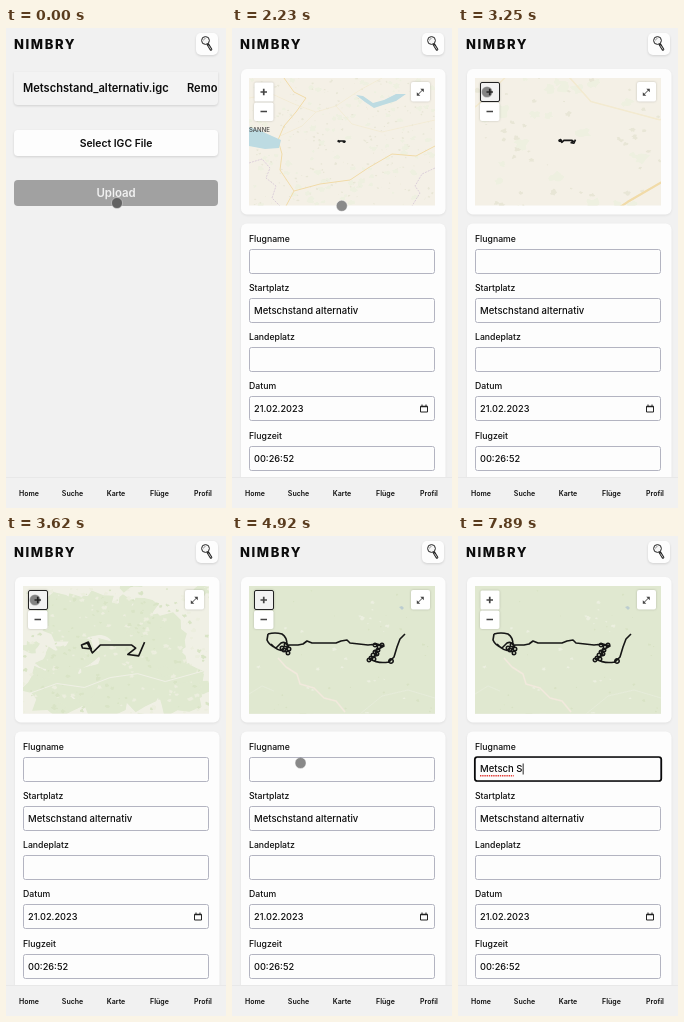
Write an HTML page that moves like this. It is 220 by 480 pixels and loops after 7990 ms.

```html
<!DOCTYPE html>
<html lang="de">
<head>
<meta charset="utf-8">
<title>Flug hochladen</title>
<style>
  html, body { margin: 0; width: 100%; height: 100%; overflow: hidden; background: #f1f1f1; }
  svg { display: block; }
  text { font-family: Inter, "Open Sans", sans-serif; fill: #0c0c0c; }
  .brand { font-size: 13px; font-weight: 800; letter-spacing: 1.6px; }
  .nav { font-size: 7px; font-weight: 600; text-anchor: middle; }
  .strong { font-size: 11.1px; font-weight: 600; }
  .mid { text-anchor: middle; }
  .label { font-size: 8.7px; font-weight: 500; }
  .value { font-size: 9.5px; font-weight: 500; }
  .num { font-size: 9.2px; }
  .card { fill: #fdfdfd; filter: drop-shadow(0 1px 1px #00000012); }
  .raised { fill: #fdfdfd; filter: drop-shadow(0 1px 1px #0002); }
  .input { fill: #fdfdfd; stroke: #b3b4c1; }
  .line { fill: none; stroke: #161616; stroke-width: 1.6; stroke-linejoin: round; vector-effect: non-scaling-stroke; }
  .ico { fill: none; stroke: #444; stroke-width: 1.7; }
</style>
</head>
<body>
<svg id="stage" width="220" height="480" viewBox="0 0 220 480">
  <defs><clipPath id="view"><rect x="17" y="50" width="186" height="127.5"/></clipPath>
    <clipPath id="row"><rect x="8" y="42" width="203" height="36"/></clipPath></defs>
  <rect width="220" height="480" fill="#f1f1f1"/>

  <g id="upload">
    <path d="M8 44V73q0 4 4 4H208q4 0 4-4V44z" fill="#f3f3f3" style="filter:drop-shadow(0 1px 1px #0002)"/>
    <g clip-path="url(#row)">
      <text class="strong" x="17" y="64">Metschstand_alternativ.igc</text>
      <text class="strong" x="181" y="64">Remove</text>
    </g>
    <rect class="raised" x="8" y="102" width="204" height="26" rx="4"/>
    <text class="strong mid" x="110" y="118.5" style="font-size:10.4px">Select IGC File</text>
    <rect x="8" y="152" width="204" height="26" rx="4" fill="#a1a1a1"/>
    <text class="strong mid" x="110" y="168.5" style="font-size:11.4px;fill:#f1f1f1">Upload</text>
  </g>

  <g id="form">
    <rect class="card" x="9" y="41" width="204.500" height="145.500" rx="6"/>
    <g clip-path="url(#view)">
      <g id="tiles">
        <g id="far"></g><g id="near"></g><g id="close"></g>
      </g>
      <g id="direct">
        <path class="line" d="M110 61V167" style="stroke-width:1.4"/>
        <circle cx="110" cy="60.500" r="3" fill="#e32222" stroke="#222"/>
        <circle cx="110" cy="167" r="3" fill="#157a26" stroke="#222"/>
      </g>
      <path id="rough" class="line" d="M75 109L82 106 85 113 76 112 75 109 81 107 86 117 94 109H126L130 112 122 118.500 133 120 139 106"/>
      <path id="track" class="line"/>
    </g>
    <g style="filter:drop-shadow(0 0 1px #0003)">
      <rect id="plus" x="22.500" y="54.500" width="19" height="19" rx="1.500" fill="#fff"/>
      <rect x="22" y="74.500" width="19.500" height="18.500" rx="2" fill="#fff"/>
      <rect x="179" y="54" width="19" height="19.500" rx="2" fill="#fff"/>
    </g>
    <path class="ico" d="M28.500 64H35M31.750 60.750V67.250M28.500 83.500H35"/>
    <path d="M186 66.500L190.500 62" stroke="#444"/>
    <path d="M191.800 60.700V64.200L188.300 60.700zM184.800 67.700V64.200L188.300 67.700z" fill="#444"/>
    <rect class="card" x="9" y="195.500" width="204.500" height="270" rx="6"/>
    <g id="fields"></g>
    <rect id="focus" x="16.800" y="221" width="186.500" height="24" rx="2.500" fill="none" stroke="#0a0a0a" stroke-width="1.700"/>
    <text id="typed" class="value" x="22" y="236.300" style="white-space:pre"></text>
    <path id="spell" fill="none" stroke="#e23b35" stroke-width="1.500" stroke-dasharray="1.400 .8"/>
    <rect id="caret" y="227.500" width=".9" height="11" fill="#111"/>
    <path d="M188.500 378.500H195.500V384H188.500zM190 376.500V378M194 376.500V378" fill="none" stroke="#222"/>
    <path d="M188.500 378.500H195.500" stroke="#222" stroke-width="1.500"/>
  </g>

  <text class="brand" x="8" y="20.500">NIMBRY</text>
  <rect class="raised" x="190" y="5" width="22" height="22" rx="5"/>
  <path d="M201.700 16L205 21.500" stroke="#222" stroke-width="2.600" stroke-linecap="round"/>
  <path d="M202.500 17.500L205 21.500" stroke="#ddd" stroke-width=".9"/>
  <circle cx="199.500" cy="12.500" r="3.900" fill="#f6f6f6" stroke="#222"/>
  <path d="M197.500 12.500q.3-2 2.200-2.300" stroke="#888" fill="none" stroke-width=".8"/>

  <rect y="449" width="220" height="31" fill="#f1f1f1"/>
  <path d="M0 449.500H220" stroke="#e8e8e8"/>
  <g id="nav"></g>
  <g id="status">
    <path d="M0 470.500H70q3 0 3 3V480H0z" fill="#dcdcdc" stroke="#bdbdbd"/>
    <text x="2" y="478" style="font-size:6.600px;fill:#555">Warten auf hoemk…</text>
  </g>
  <circle id="dot" r="5.500" stroke="#ffffff80" stroke-width=".8"/>
</svg>
<script>
const LOOP = 7990, STEP = 92.8;
const $ = id => document.getElementById(id);
const show = (id, on) => { $(id).style.display = on ? '' : 'none'; };
const clamp = v => Math.max(0, Math.min(1, v));
const ease = v => { v = clamp(v); return v * v * (3 - 2 * v); };

function add(parent, tag, attrs, text) {
  const el = document.createElementNS('http://www.w3.org/2000/svg', tag);
  for (const k in attrs) el.setAttribute(k, attrs[k]);
  if (text) el.textContent = text;
  parent.appendChild(el);
  return el;
}

function seeded(s) {
  return () => (s = (s * 16807) % 2147483647) / 2147483647;
}

// Irregular patches scattered over an area around the map centre
function patches(layer, seed, count, spread, size, fill) {
  const rnd = seeded(seed);
  let d = '';
  for (let i = 0; i < count; i++) {
    const x = 110 + (rnd() - .5) * 186 * spread, y = 113.5 + (rnd() - .5) * 128 * spread;
    const r = size * (.35 + rnd());
    for (let k = 0; k < 13; k++) {
      const a = k / 13 * Math.PI * 2, q = r * (.5 + rnd() * .8);
      d += (k ? 'L' : 'M') + (x + Math.cos(a) * q * 1.35).toFixed(1) + ' ' + (y + Math.sin(a) * q).toFixed(1);
    }
    d += 'z';
  }
  add(layer, 'path', { d, fill });
}

function road(layer, d, stroke, width, dash = 'none') {
  add(layer, 'path', { d, stroke, fill: 'none', 'stroke-width': width, 'stroke-dasharray': dash, 'stroke-linejoin': 'round' });
}

function ground(layer, fill) {
  add(layer, 'rect', { x: -180, y: -140, width: 580, height: 510, fill });
}

function buildMaps() {
  const far = $('far'), near = $('near'), close = $('close');
  ground(far, '#f4f0e6');
  patches(far, 71, 130, 1, 2.2, '#eef0e0');
  patches(far, 19, 240, 1, .8, '#e8e6d6');
  road(far, 'M17 135L30 131 38 140 34 150 44 158 40 170 48 178M203 140L190 146 183 158 188 165 180 178', '#dccfda', 1, '2 1');
  road(far, 'M17 70L40 66 62 76 84 84 104 78 128 62 150 50M84 84L70 98 48 108M104 78L120 96 150 104 203 92', '#f3ead0', .7);
  road(far, 'M52 50L62 64 74 70 64 84 52 98 46 112 50 126 48 142 62 163 54 178M62 163L88 156 118 152 136 140 160 126 184 128 203 118', '#f1dba8', 1);
  const water = '#bddbe2';
  add(far, 'path', { d: 'M17 99L29 103 40 108 49 112 47 120 33 121 17 118z', fill: water });
  add(far, 'path', { d: 'M124 67L131 68 141 75 152 72 164 66 174 66 164 73 151 77 142 80 133 74z', fill: water });
  add(far, 'text', { x: 17, y: 104, style: 'font-size:6px;font-weight:500;fill:#444' }, 'SANNE');

  ground(near, '#f0f0e5');
  patches(near, 37, 70, .78, 15, '#e0e9d0');
  patches(near, 11, 60, 2.2, 7, '#e0e9d0');
  patches(near, 53, 170, 1.2, 1.7, '#eceede');
  patches(near, 29, 150, 1.1, 1.5, '#d9e4c6');
  road(near, 'M17 160L50 148 78 152 104 142 132 138 160 146 203 134', '#f0f0e6', 1);

  ground(close, '#e0e8d0');
  patches(close, 91, 70, 1.8, 1.3, '#ecefe0');
  patches(close, 23, 90, 1.8, 1, '#d8e2c4');
  road(close, 'M46 122L54 131 65 138 68 148 82 152 92 162 104 165 113 176', '#f2e9dd', 1.5);
  road(close, 'M17 158L30 150 42 155M128 178L150 160 176 154 203 162', '#e8ecdc', .8);
  add(close, 'path', { d: 'M167 71l3-1 2 2-2 2z', fill: '#bccdd0' });
}

function buildTrack() {
  const ring = (x, y, r = 1.7) => `M${x - r} ${y}a${r} ${r} 0 1 0 ${2 * r} 0a${r} ${r} 0 1 0 ${-2 * r} 0`;
  const knots = [[54, 109], [52, 114], [56, 117], [50, 112], [57, 113],
    [150, 109], [147, 111], [143, 109], [146, 114], [143, 116], [145, 118], [141, 119], [139, 122], [142, 123], [137, 124]];
  const d = 'M36 98Q43 96 50 98Q55 101 55 109Q53 105 49 107L44 112Q37 109 35 104L36 98'
    + 'M39 108Q45 115 53 115L57 109 66 109 71 108 75 105 80 107 104 107 109 105 115 104 118 107 136 109 145 108 152 110'
    + ' 143 115 145 119 138 123Q146 128 157 126L162 121 165 111 168 103 173 98';
  $('track').setAttribute('d', d + knots.map(k => ring(...k)).join('') + ring(159, 125, 2.2));
}

const fields = [
  ['Flugname', 221], ['Startplatz', 270, 'Metschstand alternativ'], ['Landeplatz', 319],
  ['Datum', 368, '21.02.2023', 'num', 'tt.mm.jjjj'], ['Flugzeit', 418, '00:26:52', 'num']
];
const values = [];

function buildForm() {
  for (const [name, y, value, cls = '', hint = ''] of fields) {
    const g = $('fields');
    add(g, 'text', { class: 'label', x: 17, y: y - 7.500 }, name);
    add(g, 'rect', { class: 'input', x: 17.500, y: y + .5, width: 185, height: 24, rx: 2 });
    if (value) values.push({ el: add(g, 'text', { x: 22, y: y + 15.500 }), value, hint, cls });
  }
  ['Home', 'Suche', 'Karte', 'Flüge', 'Profil'].forEach((name, i) =>
    add($('nav'), 'text', { class: 'nav', x: 23 + i * 43.500, y: 467.700 }, name));
}

// time, x, y
const pointer = [[0, 111, 175], [2140, 111, 175], [2600, 98, 205], [2960, 29, 64], [4200, 29, 64], [5010, 70, 233], [LOOP, 70, 233]];
const typing = [[5850, 'M'], [6500, 'Me'], [6780, 'Met'], [6960, 'Mets'], [7060, 'Metsc'], [7150, 'Metsch'], [7330, 'Metsch '], [7800, 'Metsch S']];
const zooms = [2990, 3190, 3390, 3700];

function place(t) {
  let i = 1;
  while (pointer[i][0] < t) i++;
  const [t0, x0, y0] = pointer[i - 1], [t1, x1, y1] = pointer[i];
  const p = ease((t - t0) / (t1 - t0));
  return [x0 + (x1 - x0) * p, y0 + (y1 - y0) * p];
}

function zoomTo(id, level, opacity) {
  const s = 2 ** level;
  $(id).setAttribute('transform', `translate(110 113.5) scale(${s}) translate(-110 -113.5)`);
  $(id).style.opacity = opacity;
}

function draw(t) {
  const loaded = t >= 1850, focused = t >= 5200;
  show('upload', t < 1665);
  show('form', t >= 1665);
  show('status', t >= 1665 && t < 2030);
  show('direct', !loaded);

  $('tiles').style.opacity = clamp((t - 1800) / 220);
  const level = -4.2 + zooms.reduce((sum, z) => sum + 1.05 * ease((t - z) / 250), 0);
  zoomTo('far', level + 4.2, 1);
  zoomTo('near', level + 1.05, clamp((level + 2.1) / .6));
  zoomTo('close', level, clamp((level + .75) / .7));
  zoomTo('rough', level + 1.05, loaded && level < -.5 ? 1 : 0);
  zoomTo('track', level, level >= -.5 ? 1 : 0);

  for (const { el, value, hint, cls } of values) {
    el.textContent = loaded ? value : hint;
    el.setAttribute('class', 'value ' + (loaded ? cls : ''));
  }

  const pressed = t >= 2985 && !focused;
  $('plus').setAttribute('fill', pressed ? '#f2f2f2' : '#fff');
  $('plus').setAttribute('stroke', pressed ? '#222' : 'none');

  const word = typing.reduce((w, [at, s]) => t >= at - 5 ? s : w, '');
  const typed = $('typed');
  typed.textContent = word;
  show('focus', focused);
  show('caret', focused && (t < 5600 || word));
  $('caret').setAttribute('x', 22.300 + (word ? typed.getComputedTextLength() : 0));
  const wrong = word.length > 6;
  show('spell', wrong);
  if (wrong) $('spell').setAttribute('d', `M22 239.800H${22 + typed.getSubStringLength(0, 6)}`);

  const [x, y] = place(t);
  const dot = $('dot');
  dot.setAttribute('cx', x);
  dot.setAttribute('cy', y);
  dot.setAttribute('fill', t < 1665 ? '#626262' : '#8a8a8a');
  dot.style.mixBlendMode = pressed ? 'multiply' : '';
  show('dot', !word);
}

buildMaps();
buildTrack();
buildForm();

const start = performance.now();
function tick() {
  const t = (performance.now() - start) % LOOP;
  draw(Math.min(LOOP, Math.floor((t + 3) / STEP) * STEP));
  requestAnimationFrame(tick);
}
tick();
</script>
</body>
</html>
```
